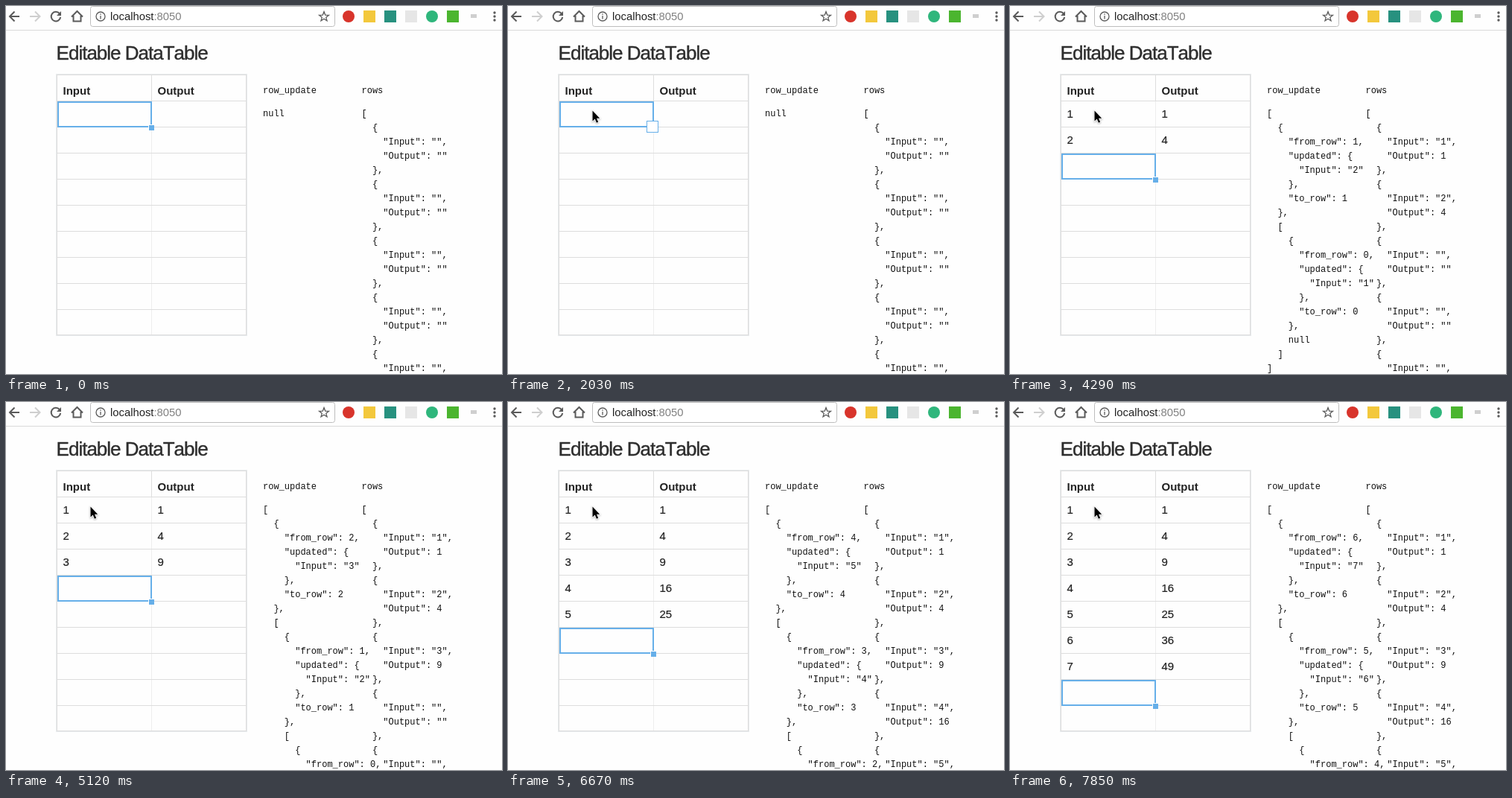
An HTML page for the animation above (8000 ms loop, 666 px wide and 494 px high).

```html
<!DOCTYPE html>
<html lang="en">
<head>
<meta charset="utf-8">
<title>Editable DataTable</title>
<style>
  html, body { margin: 0; width: 100%; height: 100%; overflow: hidden; background: #fefefe; }
  svg { display: block; width: 666px; height: 494px; }
  text { font: 15px "Liberation Sans", Arial, sans-serif; fill: #222; stroke: #222; stroke-width: .2; white-space: pre; font-kerning: none; }
  .title { font-size: 26px; letter-spacing: -1px; fill: #2e2e2e; stroke: #2e2e2e; stroke-width: .4; }
  .head { font-weight: bold; stroke: none; }
  .mono text, text.mono { font: 12px "Liberation Mono", "Courier New", monospace; fill: #111; stroke: none; }
  .url { font-size: 14.8px; stroke: none; }
  .url tspan { fill: #808080; }
  .icon { fill: none; stroke: #5a5a5a; stroke-width: 2; }
  .grid { fill: none; stroke: #ddd; }
  .editor text { font-size: 14px; fill: #555; stroke: none; }
  #cursor { filter: drop-shadow(0 1px 1px rgba(0, 0, 0, .3)); }
</style>
</head>
<body>
<svg viewBox="0 0 666 494">
  <!-- browser bar -->
  <path d="M0 32.5H666" stroke="#dadada"/>
  <g class="icon">
    <path d="M18 14H5.5M11.5 7.5L5 14l6.5 6.5"/>
    <path d="M32 14H45M39 7.5L45.5 14 39 20.5" stroke="#cfcfcf"/>
    <path d="M71.8 10A6.3 6.3 0 1 0 73.2 15"/>
    <path d="M74 7v6h-6z" fill="#5a5a5a" stroke="none"/>
    <path d="M88 14.5L95.5 7l7.5 7.5M90.5 13v7.5h10V13"/>
  </g>
  <rect x="113.5" y=".5" width="328" height="27" rx="3" fill="#fff" stroke="#bdbdbd"/>
  <g class="icon" style="stroke-width:1.3">
    <circle cx="127" cy="14" r="6"/>
    <path d="M127 13v4.5M127 10.2v1.6"/>
    <path id="star"/>
  </g>
  <text class="url" x="140" y="19">localhost<tspan>:8050</tspan></text>
  <circle cx="460" cy="14" r="8" fill="#d8342b"/>
  <rect x="480" y="6" width="16" height="16" fill="#f3c83c"/>
  <rect x="508" y="6" width="16" height="16" fill="#27917f"/>
  <rect x="536" y="6" width="16" height="16" fill="#e6e6e6"/>
  <circle cx="572" cy="14" r="8" fill="#2fb67c"/>
  <rect x="592" y="6" width="16" height="16" fill="#4bb52f"/>
  <rect x="624" y="11" width="8" height="5" fill="#cfcfcf"/>
  <g fill="#5a5a5a">
    <circle cx="656" cy="9" r="1.7"/><circle cx="656" cy="14" r="1.7"/><circle cx="656" cy="19" r="1.7"/>
  </g>

  <!-- page -->
  <text class="title" x="67.6" y="72">Editable DataTable</text>
  <path d="M195.5 128V441" stroke="#eee"/>
  <path class="grid" id="lines"/>
  <rect x="67.5" y="91.5" width="256" height="351" fill="none" stroke="#e7eaec"/>
  <rect class="grid" x="68.5" y="92.5" width="254" height="349"/>
  <text class="head" x="76.5" y="119">Input</text>
  <text class="head" x="203.5" y="119">Output</text>
  <g id="cells"></g>

  <g id="mark">
    <g id="select">
      <rect x="70" y="129" width="125" height="33" fill="none" stroke="#66afe9" stroke-width="2"/>
      <g id="small">
        <rect x="191" y="159" width="8" height="8" fill="#fff"/>
        <rect x="192" y="160" width="7" height="7" fill="#66afe9"/>
      </g>
      <rect id="large" x="186.5" y="154.5" width="15" height="15" fill="#fff" stroke="#66afe9"/>
    </g>
    <g id="edit" class="editor">
      <rect x="69" y="128" width="126" height="34" fill="#d3e7f8"/>
      <rect x="69.5" y="128.5" width="125" height="33" rx="4" fill="#fff" stroke="#66afe9"/>
      <text id="typed" x="82" y="150"></text>
    </g>
  </g>

  <text class="mono" x="345" y="117">row_update</text>
  <text class="mono" x="477.5" y="117">rows</text>
  <g class="mono" id="update"></g>
  <g class="mono" id="rows"></g>
  <path id="cursor" d="M0 0V14l3.2-3 2.2 5.2 2.3-1-2.2-5h4.2z" stroke="#fff" paint-order="stroke" stroke-width="1.6"/>
</svg>
<script>
const LOOP = 8000, ROW = 35, ROWS = 9;
const typedAt = [2500, 3930, 4770, 5600, 6310, 6900, 7490];
const commitAt = [2860, 4290, 5000, 5960, 6670, 7260, 7850];
const resultAt = [2980, 4290, 5120, 5960, 6670, 7260, 7850];
// time, x, y of the pointer tip
const path = [[1320, 220, 474], [1437, 190, 310], [1553, 146, 142], [1670, 106, 50], [1910, 110, 112], [2030, 113.5, 140.5]];

const $ = id => document.getElementById(id);
const show = (id, on) => { $(id).style.display = on ? '' : 'none'; };
const passed = (times, t) => times.filter(at => at <= t).length;

function addText(parent, x, y, str) {
  const el = document.createElementNS('http://www.w3.org/2000/svg', 'text');
  el.setAttribute('x', x);
  el.setAttribute('y', y);
  el.textContent = str;
  parent.append(el);
}

function drawJson(id, x, value) {
  const box = $(id);
  box.replaceChildren();
  JSON.stringify(value, null, 2).split('\n').slice(0, 19)
    .forEach((line, i) => addText(box, x, 148 + 19 * i, line));
}

function drawData(committed, done) {
  const cells = $('cells'), rows = [];
  let update = null;
  cells.replaceChildren();
  for (let i = 0; i < ROWS; i++) {
    const y = 150 + ROW * i, n = i + 1;
    if (i < committed) addText(cells, 76.5, y, n);
    if (i < done) {
      addText(cells, 203.5, y, n * n);
      update = [{ from_row: i, updated: { Input: String(n) }, to_row: i }, update];
    }
    rows.push(i < done ? { Input: String(n), Output: n * n } : { Input: '', Output: '' });
  }
  drawJson('update', 345, update);
  drawJson('rows', 477.5, rows);
}

function drawFixed() {
  let d = 'M195.5 93V128';
  for (let i = 0; i < ROWS; i++) d += `M69 ${127.5 + ROW * i}H323`;
  $('lines').setAttribute('d', d);
  const points = Array.from({ length: 10 }, (_, i) => {
    const a = i * Math.PI / 5, r = i % 2 ? 2.9 : 6.8;
    return `${427 + r * Math.sin(a)} ${14.4 - r * Math.cos(a)}`;
  });
  $('star').setAttribute('d', `M${points.join('L')}Z`);
}

let last = '';
function render(t) {
  const typed = passed(typedAt, t), committed = passed(commitAt, t), done = passed(resultAt, t);
  const row = t < 3700 ? 0 : Math.max(1, committed);
  const editing = typed > committed;
  const spot = path[passed(path.map(p => p[0]), t) - 1];
  const key = [typed, committed, done, row, spot].join();
  if (key === last) return;
  last = key;

  drawData(committed, done);
  $('mark').setAttribute('transform', `translate(0 ${ROW * row})`);
  $('typed').textContent = typed;
  show('edit', editing);
  show('select', !editing);
  const hover = !!spot && row === 0 && spot[1] < 195 && spot[2] >= 128 && spot[2] < 163;
  show('large', hover);
  show('small', !hover);
  show('cursor', spot);
  if (spot) $('cursor').setAttribute('transform', `translate(${spot[1]} ${spot[2]})`);
}

drawFixed();
const start = performance.now();
function tick() {
  render((performance.now() - start) % LOOP);
  requestAnimationFrame(tick);
}
tick();
</script>
</body>
</html>
```
